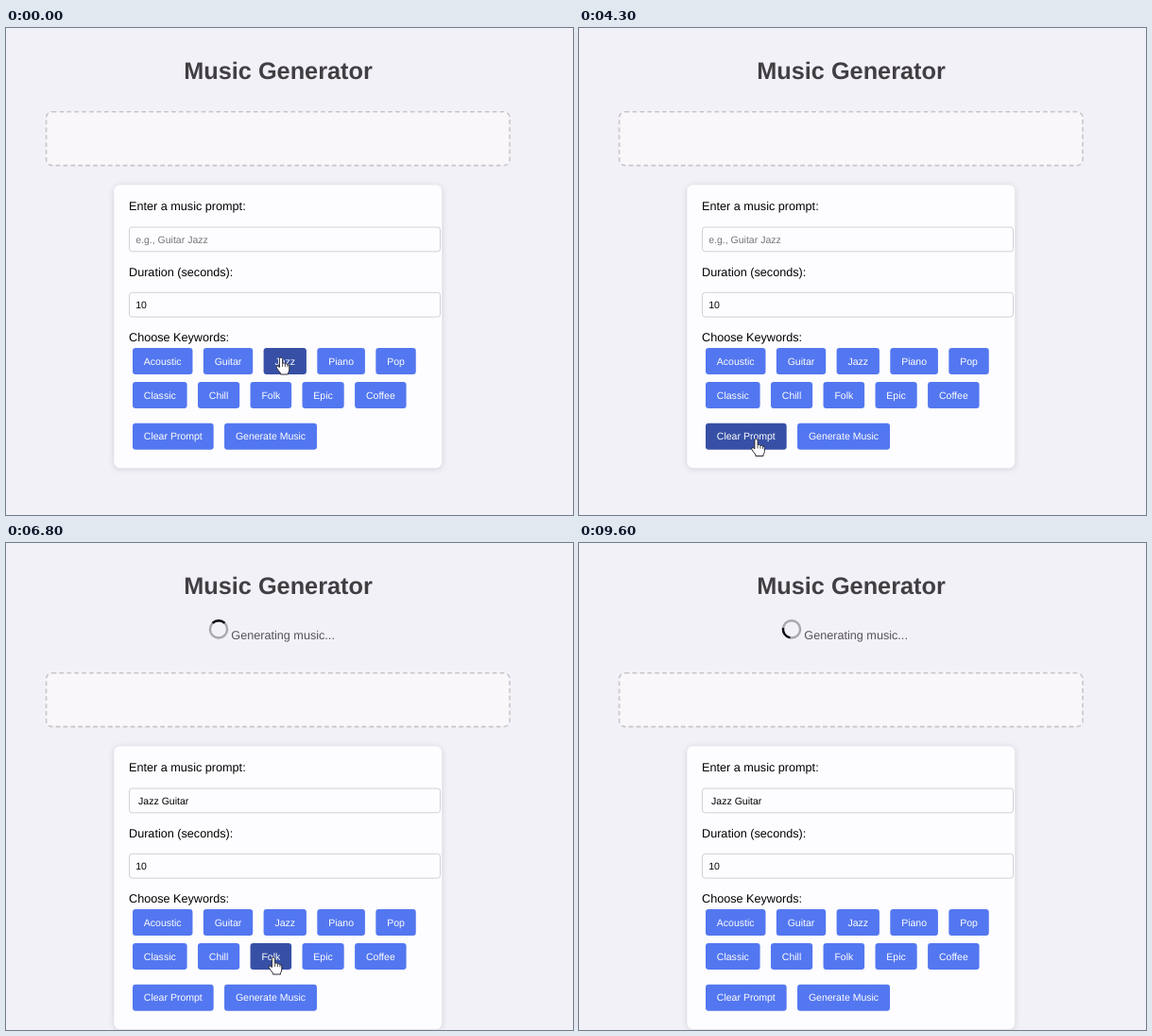
Recreate the animation shown at these times as an HTML page. Size 600x516 px, loop 9.7 s.

```html
<!DOCTYPE html>
<html lang="en">
<head>
<meta charset="utf-8">
<title>Music Generator</title>
<style>
  html, body { margin: 0; width: 100%; height: 100%; overflow: hidden; background: #f3f1f8; }
  svg { display: block; width: 600px; height: 516px; }
  text { font: 12.65px "Liberation Sans", Arial, sans-serif; text-rendering: geometricPrecision; }
  .title { font-size: 25.3px; font-weight: bold; fill: #413f42; text-anchor: middle; }
  .small { font-size: 10.53px; }
  .label { fill: #fff; }
  .field { fill: #fdfcff; stroke: #d2d0d5; stroke-width: 1; }
  .card { fill: #fdfcff; filter: drop-shadow(0 1.6px 3px rgba(0, 0, 0, .14)); }
  .drop { fill: #f9f7fa; stroke: #c8c6c9; stroke-width: 1.6; stroke-dasharray: 4.74 3.16; }
  .cursor { fill: #fff; stroke: #2b2b33; stroke-width: 1; stroke-linejoin: round; }
</style>
</head>
<body>
<svg viewBox="0 0 600 516">
  <text class="title" x="288" y="54">Music Generator</text>

  <g id="status">
    <circle cx="225" cy="91.4" r="9.1" fill="none" stroke="#a9a7ad" stroke-width="2.4"/>
    <path id="arc" d="M218.57 84.97A9.1 9.1 0 0 1 231.43 84.97" fill="none" stroke="#0c0c0e" stroke-width="2.4"/>
    <text x="238.3" y="101.6" fill="#555358">Generating music...</text>
  </g>

  <g id="page">
    <rect class="drop" x="42.6" y="88.8" width="490.4" height="56.8" rx="6"/>
    <rect class="card" x="114.3" y="166.2" width="346.9" height="300" rx="6.3"/>
    <text x="130" y="193.2">Enter a music prompt:</text>
    <rect class="field" x="130.5" y="211" width="329" height="25.8" rx="3"/>
    <text id="prompt" class="small" x="137.2" y="227.5"></text>
    <text x="130" y="262.6">Duration (seconds):</text>
    <rect class="field" x="130.5" y="280.3" width="329" height="25.8" rx="3"/>
    <text class="small" x="137.2" y="296.8">10</text>
    <text x="130" y="332">Choose Keywords:</text>
    <g id="buttons"></g>
  </g>

  <g id="cursor" class="cursor">
    <g id="hand">
      <path d="M-1.6 10.6V1.5Q-1.6 0 0 0T1.6 1.5V6.2Q3.6 5.2 4.4 7Q6.2 6.2 6.9 7.8Q8.8 7.2 8.8 9.2V13Q8.8 15.3 7.5 16.4V18H-.6V16.5Q-3 14-4.8 10.8Q-5 8.4-3.2 9.2Z"/>
      <path d="M1.6 6.2V10M4.4 7V10.2M6.9 7.8V10.4" fill="none" stroke-width=".8"/>
    </g>
    <path id="arrow" d="M0 0V13.2L3.1 10.4L5.2 15.4L7.3 14.5L5.2 9.6H9.4Z"/>
  </g>
</svg>
<script>
const LOOP = 9700, STEP = 100;
const BUSY_FROM = 6700, BUSY_SHIFT = 49, CURSOR_END = 8600;
const $ = id => document.getElementById(id);

function add(parent, tag, attrs, content) {
  const el = document.createElementNS("http://www.w3.org/2000/svg", tag);
  for (const key in attrs) el.setAttribute(key, attrs[key]);
  if (content) el.textContent = content;
  parent.appendChild(el);
  return el;
}

// Buttons take their width from the label, as inline elements do.
const buttons = [];
[
  [339, ["Acoustic", "Guitar", "Jazz", "Piano", "Pop"]],
  [375, ["Classic", "Chill", "Folk", "Epic", "Coffee"]],
  [418.8, ["Clear Prompt", "Generate Music"]]
].forEach(([y, names]) => {
  let x = 134;
  for (const name of names) {
    const rect = add($("buttons"), "rect", { x, y, height: 28, rx: 3.2 });
    const label = add($("buttons"), "text", { x: x + 11.85, y: y + 17.6, class: "small label" }, name);
    const w = label.getComputedTextLength() + 23.7;
    rect.setAttribute("width", w);
    buttons.push({ x, y, w, h: 28, rect });
    x += w + 11.4;
  }
});

// Pointer stops: time, x, y
const path = [
  [0, 291, 349], [600, 291, 349], [1100, 281, 385], [1700, 281, 385],
  [2300, 269, 441], [3700, 269, 441], [3800, 253, 445], [3900, 253, 445],
  [4200, 187.5, 435.5], [4400, 187.5, 435.5], [5400, 281, 350], [5600, 281, 350],
  [5700, 269, 353], [6000, 233, 359], [6100, 233, 359], [6500, 283, 439],
  [7600, 283, 439], [7700, 250, 453], [7800, 221.5, 456], [8000, 240, 470],
  [8200, 350, 380], [8400, 440, 180], [8500, 441, 17]
];
const prompts = [[0, ""], [200, "Jazz"], [1300, "Jazz Folk"], [4300, ""], [5500, "Jazz"], [6000, "Jazz Guitar"]];
const turns = [[6700, -.1], [6800, 0], [7800, .77], [9600, 2.59]];

const smooth = u => u * u * (3 - 2 * u);

function sample(keys, t, ease = u => u) {
  if (t <= keys[0][0]) return keys[0].slice(1);
  const i = keys.findIndex(k => k[0] > t);
  if (i < 0) return keys[keys.length - 1].slice(1);
  const a = keys[i - 1], b = keys[i];
  const u = ease((t - a[0]) / (b[0] - a[0]));
  return a.slice(1).map((v, n) => v + (b[n + 1] - v) * u);
}

// cubic-bezier(.42, 0, .58, 1)
function easeInOut(x) {
  let lo = 0, hi = 1;
  for (let i = 0; i < 20; i++) {
    const u = (lo + hi) / 2, v = 1 - u;
    if (1.26 * u * v * v + 1.74 * u * u * v + u * u * u < x) lo = u; else hi = u;
  }
  return smooth(lo);
}

const show = (el, on) => el.setAttribute("visibility", on ? "visible" : "hidden");

function draw(t) {
  const busy = t >= BUSY_FROM, shift = busy ? BUSY_SHIFT : 0;
  $("page").setAttribute("transform", `translate(0 ${shift})`);
  show($("status"), busy);
  const [turn] = sample(turns, t);
  const angle = 360 * easeInOut(turn - Math.floor(turn));
  $("arc").setAttribute("transform", `rotate(${angle} 225 91.4)`);

  const value = prompts.filter(p => p[0] <= t).pop()[1];
  $("prompt").textContent = value ? "\u00a0" + value : "e.g., Guitar Jazz";
  $("prompt").setAttribute("fill", value ? "#000" : "#757575");

  // Hover state trails the pointer by one step.
  const [hx, hy] = sample(path, t - STEP, smooth);
  const present = t < CURSOR_END;
  let hovering = false;
  for (const b of buttons) {
    const over = present && hx >= b.x && hx <= b.x + b.w && hy - shift >= b.y && hy - shift <= b.y + b.h;
    b.rect.setAttribute("fill", over ? "#3750a6" : "#5377f0");
    hovering = hovering || over;
  }
  const [x, y] = sample(path, t, smooth);
  $("cursor").setAttribute("transform", `translate(${x} ${y})`);
  show($("hand"), present && hovering);
  show($("arrow"), present && !hovering);
}

const start = performance.now();
function tick() {
  const t = (performance.now() - start) % LOOP;
  draw(Math.floor(t / STEP) * STEP);
  requestAnimationFrame(tick);
}
tick();
</script>
</body>
</html>
```
